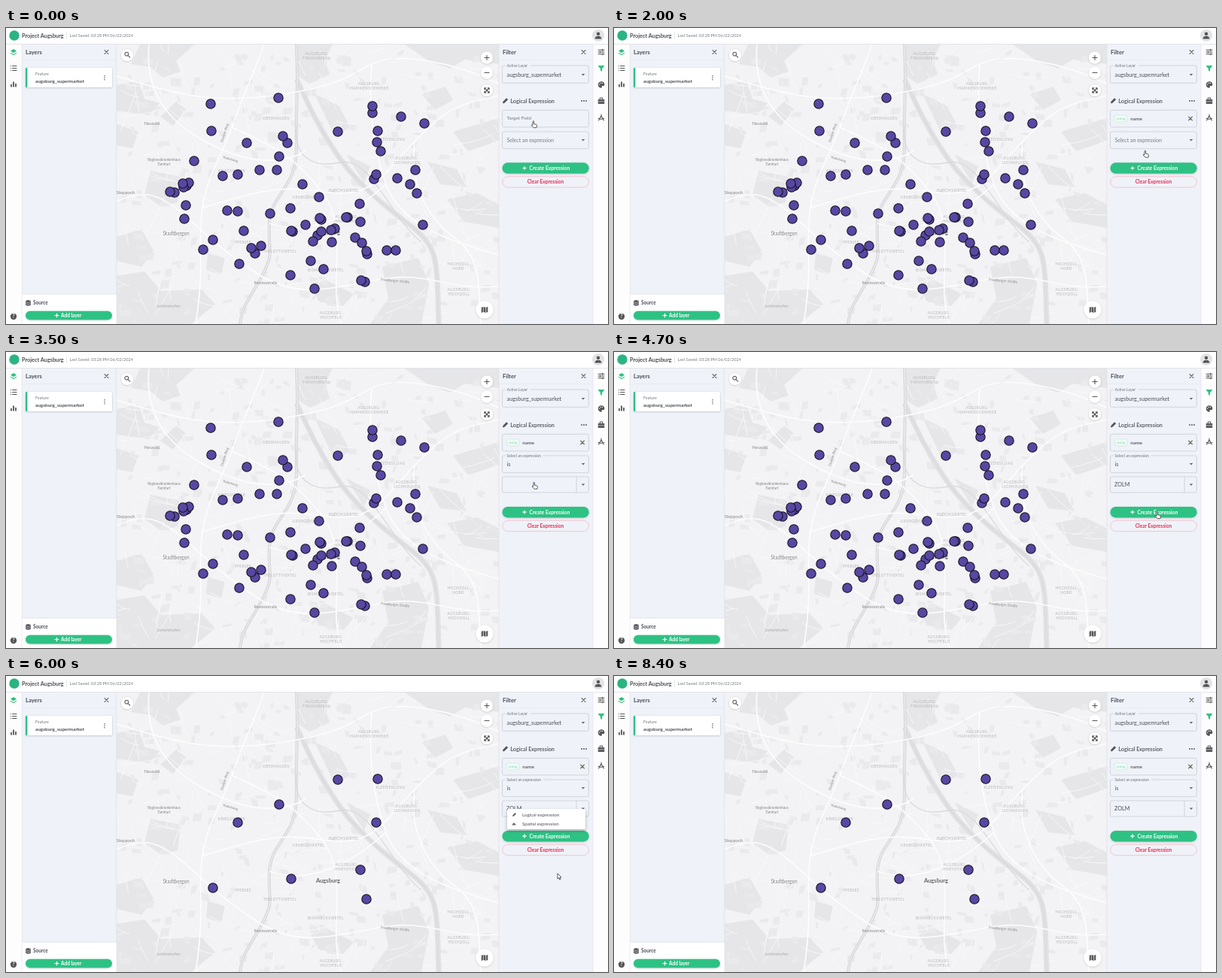
An HTML page for the animation above (8500 ms loop, 800x394 px).

```html
<!DOCTYPE html>
<html lang="en">
<head>
<meta charset="utf-8">
<title>Layer filter</title>
<style>
html, body { margin: 0; width: 100%; height: 100%; overflow: hidden; background: #fff; }
svg { display: block; width: 100vw; height: 100vh; }
text { font-family: Lato, "Open Sans", sans-serif; }
.icon { fill: none; stroke: #555; stroke-width: 1.1; stroke-linecap: round; stroke-linejoin: round; }
.label { letter-spacing: .45px; }
</style>
</head>
<body>
<svg id="stage" viewBox="0 0 800 394" preserveAspectRatio="none" xmlns="http://www.w3.org/2000/svg"></svg>
<script>
const LOOP = 8500, STEP = 100;
const GREEN = '#2fc184', INK = '#4b4e57', PANEL = '#eff2f8', LINE = '#c9ccd3';

const text = (x, y, str, size, { fill = INK, weight = 400, anchor = 'start', extra = '' } = {}) =>
  `<text x="${x}" y="${y}" font-size="${size}" fill="${fill}" font-weight="${weight}" text-anchor="${anchor}" ${extra}>${str}</text>`;
const rect = (x, y, w, h, fill, r = 0, extra = '') =>
  `<rect x="${x}" y="${y}" width="${w}" height="${h}" rx="${r}" fill="${fill}" ${extra}/>`;
const circle = (x, y, r, fill, extra = '') => `<circle cx="${x}" cy="${y}" r="${r}" fill="${fill}" ${extra}/>`;
const path = (d, fill = 'none', stroke = 'none', width = 1, extra = '') =>
  `<path d="${d}" fill="${fill}" stroke="${stroke}" stroke-width="${width}" ${extra}/>`;
const icon = (x, y, d, extra = '') => `<path class="icon" transform="translate(${x} ${y})" d="${d}" ${extra}/>`;
const group = (id, body) => `<g id="${id}">${body}</g>`;
const caret = (y, up) => path(up ? `M764.7 ${y + 1}h4.6l-2.3-2.4z` : `M764.7 ${y - 1}h4.6l-2.3 2.4z`, '#666');
const cross = (x, y, s = 2.4) => icon(x, y, `M${-s} ${-s}L${s} ${s}M${s} ${-s}L${-s} ${s}`);
const plus = (x, y) => icon(x, y, 'M-2.3 0H2.3M0 -2.3V2.3', 'style="stroke:#fff"');
const lens = (x, y) => icon(x, y, 'M1.2 -1A2.4 2.4 0 1 1 -3.6 -1A2.4 2.4 0 1 1 1.2 -1M.7 1L3.3 3.5');
const chip = (x, y, w) =>
  rect(x, y - 4.4, w, 8.8, '#f0faf6', 1, 'stroke="#bfe8d7" stroke-width=".6"') +
  text(x + w / 2, y + 1.5, 'string', 4.6, { fill: '#7fcfae', anchor: 'middle' });
const field = (y, h, color = LINE, width = .8) =>
  rect(659.6, y, 114.8, h, 'none', 2, `stroke="${color}" stroke-width="${width}"`);
const floatLabel = (y, str, w, fill = '#70737b') =>
  rect(664, y - 3, w, 4, PANEL) + text(665.5, y + 1.6, str, 5.1, { fill });

function seeded(seed) {
  return () => (seed = (seed * 16807) % 2147483647) / 2147483647;
}

function drawMap() {
  const rnd = seeded(4711);
  let blocks = '', lanes = '';
  for (let i = 0; i < 260; i++) {
    const x = 150 + rnd() * 500, y = 24 + rnd() * 368, w = 3 + rnd() * 11, h = 3 + rnd() * 8, k = rnd() * 5 - 2.5;
    blocks += `M${x} ${y}l${w} ${k}l${k} ${h}l${-w} ${-k}z`;
  }
  for (let i = 0; i < 190; i++) {
    const x = 147 + rnd() * 505, y = 22 + rnd() * 370, a = rnd() * 6.28, n = 15 + rnd() * 45;
    lanes += `M${x} ${y}q${n * Math.cos(a) / 2} ${n * Math.sin(a) / 2 + 4} ${n * Math.cos(a)} ${n * Math.sin(a)}`;
  }
  const woods = [
    'M178 22L250 22 226 44 232 58 208 66 192 52 166 48z', 'M147 76L176 70 184 94 204 100 190 116 147 110z',
    'M147 128L176 138 168 160 147 156z', 'M205 118L226 98 239 108 222 130z',
    'M192 190L232 198 228 232 206 238 184 222z', 'M147 278L180 268 196 296 180 318 147 310z',
    'M147 330L184 324 206 350 260 348 278 368 246 394 147 394z', 'M268 300L291 306 286 328 266 322z',
    'M388 22L434 22 424 42 430 62 404 74 388 64z', 'M530 22L655 22 655 48 610 42 590 54 562 44z',
    'M553 88L584 78 594 96 570 109z', 'M594 138L655 120 655 150 614 164z', 'M560 178L599 188 612 212 577 208z',
    'M586 228L626 220 655 235 655 266 609 258z', 'M500 318L548 306 562 340 552 394 484 394 508 360z',
    'M405 345L426 336 462 354 448 370 416 364z', 'M410 88L444 104 457 132 437 144z', 'M452 168L484 184 476 206z'
  ].join('');
  const river = 'M386 68C401 100 412 126 437 164S493 229 535 261 572 309 575 394';
  const rail = 'M386 22C389 83 385 99 386 157S352 219 350 260 358 298 338 334 315 368 311 394';
  const roads = [
    'M343 22C331 57 314 92 300 132S268 195 261 239 265 313 252 394', 'M147 231C185 213 206 222 238 250S294 302 337 329 415 351 489 336 583 350 655 344',
    'M147 64C224 87 269 101 354 90S453 65 486 48 595 45 655 74', 'M300 132C350 155 382 168 420 218S426 337 446 394',
    'M261 239C311 226 354 206 420 218S500 196 543 151 600 102 655 90', 'M486 48C481 109 488 161 505 208S572 280 655 302',
    'M190 22C183 98 229 136 285 161S382 175 398 163', 'M350 260C390 274 444 264 505 208', 'M543 151C535 207 560 253 598 281S626 351 631 394'
  ].join('');
  const area = { fill: '#b6b5ba', anchor: 'middle', extra: 'class="label"' };
  const place = { fill: '#88878c', anchor: 'middle' };
  const labels = [
    [413, 36, 'AUGSBURG-'], [413, 42, 'FIRNHABERAU'], [483, 76, 'AUGSBURG-'], [483, 82, 'HAMMERSCHMIEDE'],
    [359, 122, 'OBERHAUSEN'], [300, 191.5, 'KRIEGSHABER'], [511, 149.5, 'KLEESIEDLUNG'],
    [533, 175, 'AUGSBURG-'], [533, 181, 'LECHHAUSEN'], [449, 218, 'BLEICHVIERTEL'], [402, 227, 'GEORGSVIERTEL'],
    [453, 253, 'AUGSBURG-'], [453, 259, 'INNENSTADT'], [315, 287, 'PFERSEE'], [364, 299, 'THELOTTVIERTEL'],
    [425, 323.5, 'BISMARCKVIERTEL'], [601, 316, 'HOCHZOLL'], [601, 322, 'NORD'],
    [602, 350, 'AUGSBURG-'], [602, 356, 'HOCHZOLL'], [432, 381, 'AUGSBURG-'], [432, 387, 'HOCHFELD']
  ].map(([x, y, s]) => text(x, y, s, 4.7, area)).join('');
  const street = (x, y, a, s) => text(0, 0, s, 4.7, { ...place, extra: `transform="translate(${x} ${y}) rotate(${a})"` });
  return rect(147, 22, 508, 372, '#f3f2f4') + path(woods, '#e6e5e8') + path(blocks, '#eae9ec') +
    path(lanes, 'none', '#fafafa', .8) + path(river, 'none', '#e2e1e4', 7) +
    path(river, 'none', '#d3d3d6', 2) + path(river, 'none', '#ededf0', .7) +
    path(rail, 'none', '#dad9dc', 4) + path(rail, 'none', '#f2f2f4', 1) +
    path('M386 130C382 167 403 188 444 179S510 252 552 285', 'none', '#dad9dc', 1.3) +
    path(roads, 'none', '#fdfdfd', 1.6) + labels +
    text(194, 129, 'Neusäß', 6.2, place) + text(159, 221, 'Steppach', 6.2, place) +
    text(226, 275.5, 'Stadtbergen', 6.6, place) + text(216, 372, 'Leitershofen', 5.8, { ...place, fill: '#aaa9ae' }) +
    text(210, 177, 'Regionalkrankenhaus', 4.7, place) + text(210, 183, 'Tannfurt', 4.7, place) +
    text(428, 275, 'Augsburg', 7.6, { ...place, fill: '#66656a', weight: 700 }) +
    street(292, 140, -72, 'Dayton-Ring') + street(298, 176, 17, 'Kobelweg') +
    street(517, 338, 5, 'Friedberger Straße') + street(345, 341, 0, 'Rosenaustraße');
}

const kept = [[441, 138], [494, 137], [363, 171], [308, 195], [492, 195], [471, 258], [379, 270], [275, 282], [479, 297]];
const north = [
  [272, 101], [362, 93], [273, 137], [320, 153], [374, 153], [368, 144], [250, 177], [288, 197], [337, 189],
  [360, 189], [394, 208], [487, 113], [487, 104], [525, 118], [556, 127], [493, 152], [498, 164], [544, 189],
  [489, 201], [520, 200], [537, 208], [546, 220], [240, 210], [243, 206], [236, 212], [235, 207], [224, 219], [218, 218]
];
const south = [
  [239, 236], [237, 254], [294, 243], [308, 244], [351, 247], [378, 240], [416, 225], [470, 234], [316, 270],
  [262, 295], [331, 300], [326, 293], [339, 290], [310, 314], [381, 271], [398, 262], [419, 255], [417, 253],
  [454, 252], [452, 252], [414, 276], [419, 271], [408, 284], [433, 285], [437, 267], [432, 269], [464, 279],
  [473, 286], [480, 301], [506, 296], [518, 296], [554, 262], [405, 310], [422, 321], [378, 329], [410, 347],
  [477, 338], [472, 336]
];
const dots = list => list.map(([x, y]) => circle(x, y, 6.2, '#5847a3', 'stroke="#15131f" stroke-width="1.1"')).join('');

function drawShell() {
  const disc = (x, y, r) => circle(x, y, r, '#fff', 'filter="url(#soft)"');
  const bold = { weight: 700 };
  return rect(0, 0, 800, 22, '#fff') + path('M0 21.5H800', 'none', '#dcdee3', .8) +
    circle(11, 10, 6.7, '#2bb381') + text(21, 12.8, 'Project Augsburg', 7.3, bold) +
    path('M80.5 5V15', 'none', '#d8d8dc', .6) + text(84.5, 12, 'Last Saved: 03:28 PM 06/02/2024', 5.5, { fill: '#777a82' }) +
    circle(787, 10, 8, '#e2e3e6') + circle(787, 7.7, 2.2, '#555') + path('M782.6 14.5q0-3.8 4.4-3.8t4.4 3.8z', '#555') +
    // left rail and layers panel
    rect(0, 22, 21, 372, '#fdfdfe') + rect(21, 22, 126, 372, PANEL) + path('M21.3 22V394M146.7 22V394', 'none', '#e0e3ea', .7) +
    path('M6 30.6l4-2.6 4 2.6-4 2.6zM6 32.5l4 2.4 4-2.4v1.3l-4 2.5-4-2.5z', GREEN) +
    icon(10, 53.5, 'M-3.8 -3h.2M-1.5 -3H4M-3.8 0h.2M-1.5 0H4M-3.8 3h.2M-1.5 3H4') +
    icon(10, 75, 'M-3 3.5V0M0 3.5V-3.5M3 3.5V-1', 'style="stroke-width:1.8;stroke-linecap:butt"') +
    circle(10, 384, 4.2, '#555') + text(10, 386.3, '?', 6.5, { fill: '#fff', weight: 700, anchor: 'middle' }) +
    text(26, 34.6, 'Layers', 7.6, bold) + cross(133.5, 32) + path('M21 42.5H147', 'none', '#e6e9ef', .7) +
    rect(26, 53, 115, 26, '#fff', 1.5, 'filter="url(#soft)"') + rect(26, 53, 2.4, 26, GREEN, .8) +
    text(39, 62.6, 'Feature', 5.4, { fill: '#777a82' }) + text(39, 73, 'augsburg_supermarket', 6.4, bold) +
    [63.8, 66.3, 68.8].map(y => circle(131, y, .75, '#555')).join('') +
    rect(21.5, 354, 125, 40, '#fff') + path('M21 354H147', 'none', '#dfe2e8', 1) +
    path('M26 363.5q3.5-2.4 7 0v5q-3.5 2.4-7 0z', INK) + path('M26 364.5q3.5 2 7 0M26 366.8q3.5 2 7 0', 'none', '#fff', .6) +
    text(36, 368, 'Source', 6.5, bold) + rect(26, 376.7, 115, 11.8, GREEN, 5.9, 'filter="url(#soft)"') +
    plus(67.5, 382.6) + text(73, 384.8, 'Add layer', 6.5, { fill: '#fff', weight: 700 }) +
    // map controls
    disc(161, 36, 8) + lens(161.5, 35.6) + disc(639, 39.5, 8) + icon(639, 39.5, 'M-3 0H3M0 -3V3') +
    disc(639, 59.5, 8) + icon(639, 59.5, 'M-3 0H3') + disc(639, 83, 8) +
    icon(639, 83, 'M-3 -3L3 3M3 -3L-3 3M-3.2 -1.2v-2h2M1.2 -3.2h2v2M3.2 1.2v2h-2M-1.2 3.2h-2v-2') +
    disc(636, 375, 11.5) + path('M631.7 371.9l2.6-1 3.4 1.2 2.6-1v7l-2.6 1-3.4-1.2-2.6 1z', '#555') +
    path('M634.3 371v7M637.7 372v7', 'none', '#fff', .7) +
    // filter panel and right rail
    rect(655, 22, 125, 372, PANEL) + rect(780, 22, 20, 372, '#fdfdfe') + path('M655 22V394M780 22V394', 'none', '#e0e3ea', .7) +
    text(660, 34.6, 'Filter', 7.6, bold) + cross(767.5, 32) + path('M655 42.5H780', 'none', '#e6e9ef', .7) +
    icon(791, 32, 'M-4 -2.7H4M-4 0H4M-4 2.7H4M1.5 -3.7v2M-1.5 -1v2M2 1.7v2') +
    path('M786.5 50h9l-3.4 4.3v3.6l-2.2-1.3v-2.3z', GREEN) +
    path('M791 71.3a4.2 4.2 0 1 0 0 8.4q1.5-.2 .7-1.7 0-1.2 1.6-1h1.2q1-.3.8-1.7a4.2 4.2 0 0 0-4.3-4z', '#555') +
    [[788.7, 75.3], [790.2, 73.3], [792.4, 73.5]].map(([x, y]) => circle(x, y, .7, '#fff')).join('') +
    rect(786.7, 95, 8.6, 6, '#555', .8) + icon(791, 94.5, 'M-1.7 0v-1.5h3.4V0') + path('M786.7 97.8h8.6', 'none', '#fff', .6) +
    icon(791, 119, 'M0 -4V-2L-3.3 4M0 -2L3.3 4M-3.8 1.5Q0 3 3.8 1.5') +
    field(50, 23.3) + floatLabel(50, 'Active Layer', 33) + text(665.5, 64.5, 'augsburg_supermarket', 7.3) + caret(62) +
    path('M660 100.5l.6-2.8 4.5-4.5 2 2-4.5 4.5z', '#555') + text(670.3, 99.7, 'Logical Expression', 7.2, { weight: 700, fill: '#5c5f68' }) +
    [765, 768, 771].map(x => circle(x, 97, .95, '#555')).join('');
}

function drawButtons() {
  return `<rect id="create" x="659.5" y="179.3" width="115.2" height="14.5" rx="7.2" filter="url(#soft)"/>` +
    plus(689, 186.5) + text(695.5, 189, 'Create Expression', 6.7, { fill: '#fff', weight: 700 }) +
    rect(659.8, 197.7, 114.6, 14.4, 'none', 7.2, 'stroke="#efb3c0" stroke-width=".7"') +
    text(717, 207.2, 'Clear Expression', 6.6, { fill: '#e0315a', weight: 700, anchor: 'middle' });
}

function drawFieldMenu() {
  const names = ['layer_id', 'name', 'operator', 'street', 'housenumber', 'zipcode', 'phone', 'email'];
  return rect(659, 132.5, 116, 146, '#fff', 2, 'filter="url(#drop)"') +
    names.map((n, i) => chip(663.5, 167.8 + i * 14.23, 19.5) + text(688, 170 + i * 14.23, n, 6.7, { weight: 600 })).join('') +
    rect(663.5, 276.5, 19.5, 2, '#f0faf6', 0, 'stroke="#bfe8d7" stroke-width=".4"') +
    rect(663.2, 137.6, 108, 23, '#fff', 2, `stroke="${GREEN}" stroke-width="1.2"`) + lens(674, 149) +
    text(682.5, 151.5, 'Search', 6.8, { fill: '#a5a8ae' }) + path('M682 145V153', 'none', '#555', .6) +
    rect(772.3, 138, 1.6, 58, '#a9abb0', .8);
}

function drawRuleMenu() {
  const rules = ['is', 'is not', 'includes', 'excludes', 'starts with', 'ends with', 'contains the text',
    "doesn't contains the text", 'is empty string', 'is not empty string'];
  return rect(659, 161.5, 116, 156.5, '#fff', 2, 'filter="url(#drop)"') + rect(659, 164.5, 116, 15, '#f4f4f5') +
    rules.map((r, i) => text(666, 174.4 + i * 15.04, r, 7.1)).join('');
}

const stage = document.getElementById('stage');
stage.innerHTML =
  `<defs><filter id="soft" x="-20%" y="-40%" width="140%" height="190%"><feDropShadow dx="0" dy=".6" stdDeviation=".8" flood-opacity=".22"/></filter>
  <filter id="drop" x="-10%" y="-10%" width="120%" height="125%"><feDropShadow dx="0" dy="2" stdDeviation="2" flood-opacity=".3"/></filter></defs>` +
  drawMap() + group('others', dots(north) + dots(south)) + group('kept', dots(kept)) + drawShell() +
  group('targetIdle', field(109.3, 22.6)) +
  group('targetFocus', field(109.3, 22.6, GREEN, 1.2)) +
  group('targetEmpty', text(665.5, 122.2, 'Target Field', 6.4, { fill: '#777a82' })) +
  group('targetSet', chip(665.5, 120.5, 16.5) + text(686.3, 122.5, 'name', 6.5, { weight: 600 }) + cross(766, 120.5)) +
  group('ruleEmpty', field(138, 22.7) + text(665.5, 151.5, 'Select an expression', 7, { fill: '#777a82' }) + caret(149)) +
  group('ruleOpen', field(138, 22.7, GREEN, 1.2) + floatLabel(138, 'Select an expression', 50, GREEN) + caret(149, true)) +
  group('ruleSet', field(138, 22.7) + floatLabel(138, 'Select an expression', 50) + text(665.5, 151.7, 'is', 7.3) + caret(149)) +
  group('valueBox', field(166, 21) + path('M758 166V187', 'none', LINE, .8) + caret(176.6) + text(665, 179.3, '', 7.2, { extra: 'id="value"' })) +
  group('buttons', drawButtons()) + group('fieldMenu', drawFieldMenu()) + group('ruleMenu', drawRuleMenu()) +
  group('kindMenu', rect(666, 177, 104, 27, '#fff', 2, 'filter="url(#drop)"') +
    path('M673 187l.5-2 3-3 1.5 1.5-3 3zM675 195l3 3.5h-6z', '#666') +
    text(686, 187, 'Logical expression', 6.2) + text(686, 199, 'Spatial expression', 6.2)) +
  group('cursor',
    group('hand', path('M-1-3.2q.8-1.2 1.6 0V.2l3 .7q1 .3.9 1.4L4 5.2H.2L-2.8 2q0-1.2 1.8-.3z', '#fff', '#333', .8)) +
    group('arrow', path('M-1.5-4V3.2L.2 1.8 1.3 4.3 2.5 3.8 1.4 1.4 3.6 1.2z', '#fff', '#333', .8)));

const $ = Object.fromEntries([...stage.querySelectorAll('[id]')].map(el => [el.id, el]));

// id: [from, to] in ms
const windows = {
  others: [0, 5000], targetFocus: [500, 1700], targetEmpty: [0, 1700], targetSet: [1700, LOOP],
  fieldMenu: [600, 1700], ruleEmpty: [0, 2500], ruleOpen: [2500, 3200], ruleMenu: [2500, 3200],
  ruleSet: [3200, LOOP], valueBox: [3200, LOOP], hand: [0, 5700], arrow: [5700, 7900]
};
// time, x, y
const moves = [[0, 701, 127.5], [700, 701, 127.5], [1100, 692, 172.5], [1400, 696, 183], [1800, 696, 183], [2200, 716, 151],
  [2500, 716, 151], [2800, 690, 174.5], [3300, 690, 174.5], [3600, 706, 178], [4300, 706, 178], [4700, 722, 216.5],
  [5200, 724, 217.5], [5500, 724, 217.5], [6200, 737, 279], [7400, 737, 279], [7900, 728, -8]];

const clamp = v => Math.max(0, Math.min(1, v));
function pointAt(t) {
  const i = moves.findIndex(m => m[0] > t);
  if (i < 0) return moves.at(-1).slice(1);
  const [t0, x0, y0] = moves[i - 1], [t1, x1, y1] = moves[i];
  const p = (t - t0) / (t1 - t0), e = p * p * (3 - 2 * p);
  return [x0 + (x1 - x0) * e, y0 + (y1 - y0) * e];
}

function render(t) {
  for (const [id, [from, to]] of Object.entries(windows)) $[id].style.display = t >= from && t < to ? '' : 'none';
  $.kept.style.display = t < 5000 || t >= 5500 ? '' : 'none';
  $.value.textContent = 'ZOLM'.slice(0, Math.max(0, Math.floor((t - 3600) / 100)));
  $.buttons.setAttribute('transform', `translate(0 ${t < 3200 ? 0 : 26.6})`);
  $.create.setAttribute('fill', t >= 5100 && t < 5500 ? '#218a5d' : GREEN);
  $.kindMenu.setAttribute('opacity', t < 6000 ? clamp((t - 5150) / 300) : clamp((6600 - t) / 200));
  $.cursor.setAttribute('transform', `translate(${pointAt(t)})`);
}

function tick() {
  render(Math.floor(performance.now() % LOOP / STEP) * STEP);
  requestAnimationFrame(tick);
}
tick();
</script>
</body>
</html>
```
